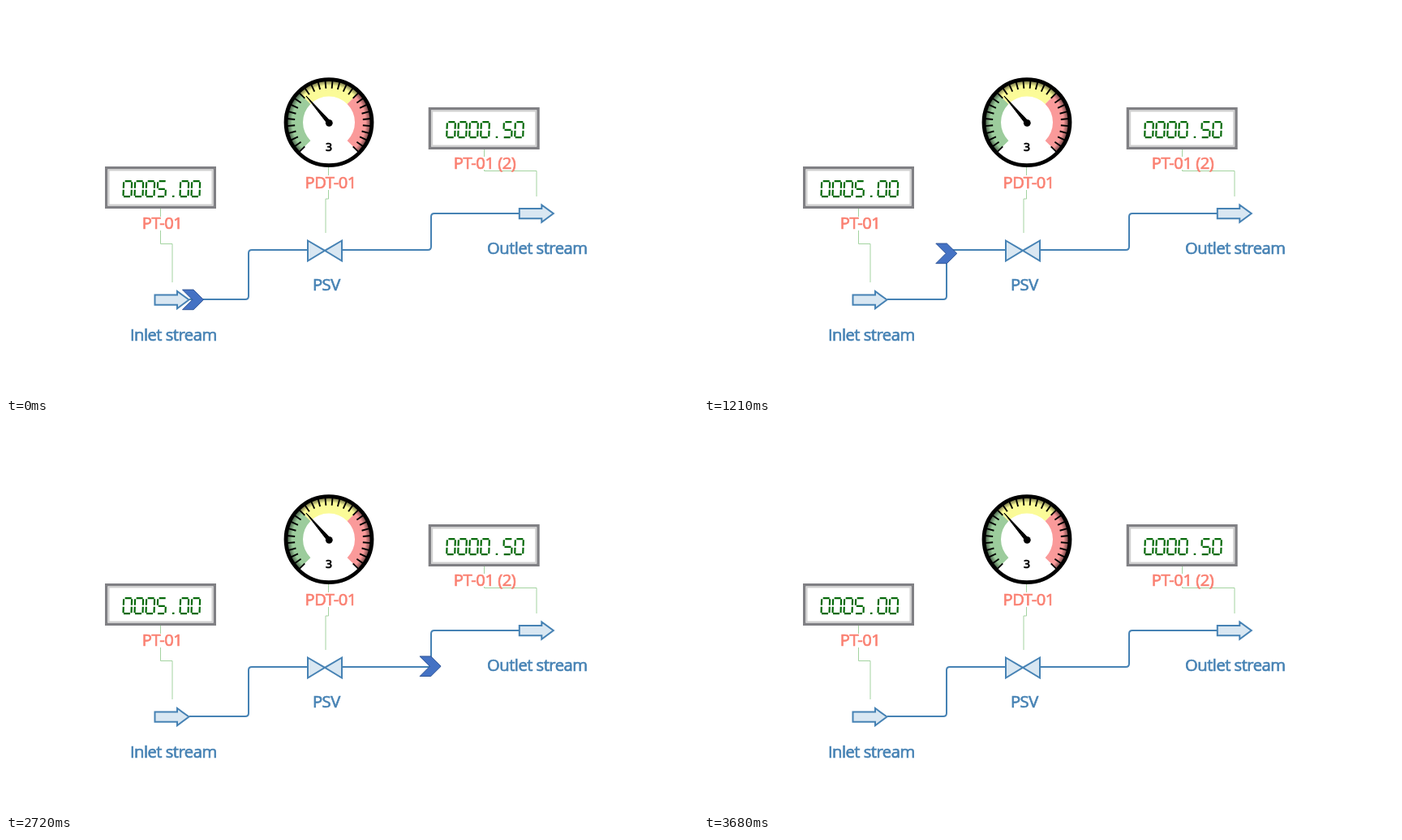
Write an HTML page that moves like this. It is 853x480 px and loops after 3.74 s.

```html
<!DOCTYPE html>
<html lang="en">
<head>
<meta charset="utf-8">
<title>Relief valve flow</title>
<style>
html, body { margin: 0; width: 100%; height: 100%; overflow: hidden; background: #fff; }
svg { display: block; width: 853px; height: 480px; }
.label { font: 500 20.2px "Open Sans", "Noto Sans", sans-serif; letter-spacing: -.5px; text-anchor: middle; stroke-width: .7; }
.blue { fill: #4682b4; stroke: #4682b4; }
.red { fill: #fa8072; stroke: #fa8072; }
.pipe { fill: none; stroke: #4682b4; stroke-width: 2; }
.part { fill: #d9e7f2; stroke: #4682b4; stroke-width: 2; }
.link { fill: none; stroke: #a3d3a0; stroke-width: 1; }
.digit { fill: none; stroke: #06690a; stroke-width: 2.2; }
</style>
</head>
<body>
<svg viewBox="0 0 853 480">
  <defs>
    <radialGradient id="rim" gradientUnits="userSpaceOnUse" cx="0" cy="0" r="52">
      <stop offset=".87" stop-color="#000" stop-opacity="0"/>
      <stop offset="1" stop-color="#000" stop-opacity=".6"/>
    </radialGradient>
  </defs>

  <g class="link">
    <path d="M190.5 250V260M190.5 277V293.5H205V341"/>
    <path d="M397.5 198V209M397.5 227V238H394V280"/>
    <path d="M589.5 177V186M589.5 202V203.5H654V235"/>
  </g>
  <g class="pipe">
    <path d="M226 362H295Q299 362 299 358V305Q299 301 303 301H372"/>
    <path d="M414 301H520Q524 301 524 297V260Q524 256 528 256H633"/>
  </g>
  <g class="part">
    <path id="arrow" d="M183.5 356.5H211V352L225.5 362.5L211 373.3V368.7H183.5Z"/>
    <use href="#arrow" x="449.3" y="-106.5"/>
    <path d="M372 289.5L393 301.8L372 314.5ZM414 289.5L393 301.8L414 314.5Z"/>
  </g>

  <g id="gauge" transform="translate(398 143.6)"></g>
  <g id="screens"></g>

  <g class="label red">
    <text x="192.6" y="275">PT-01</text>
    <text x="400.2" y="225">PDT-01</text>
    <text x="590" y="201">PT-01 (2)</text>
  </g>
  <g class="label blue">
    <text x="206.3" y="412.5">Inlet stream</text>
    <text x="394.8" y="351">PSV</text>
    <text x="654.8" y="306">Outlet stream</text>
  </g>

  <path id="chevron" d="M-13 -12.3H.6L13 0L.6 12.3H-13L-.7 0Z" fill="#4472c4" stroke="#2f5597"/>
</svg>
<script>
const LOOP = 3740;
const $ = id => document.getElementById(id);

// Point on the dial, angle in degrees clockwise from the top.
function polar(r, deg) {
  const a = deg * Math.PI / 180;
  return (r * Math.sin(a)).toFixed(2) + " " + (-r * Math.cos(a)).toFixed(2);
}

function drawGauge() {
  const band = (from, color) =>
    `<path fill="${color}" d="M${polar(52, from)}A52 52 0 0 1 ${polar(52, from + 90)}` +
    `L${polar(32, from + 90)}A32 32 0 0 0 ${polar(32, from)}Z"/>`;
  const sector = `M0 0L${polar(52, -135)}A52 52 0 1 1 ${polar(52, 135)}Z`;
  let ticks = "";
  for (let a = -135; a <= 135; a += 10) ticks += `M${polar(42, a)}L${polar(52, a)}`;
  $("gauge").innerHTML =
    `<circle r="52" fill="#fff"/>` +
    band(-135, "#9ccc9c") + band(-45, "#fbfb98") + band(45, "#fa9a9a") +
    `<path d="${sector}" fill="url(#rim)"/>` +
    `<path d="${ticks}" stroke="#000" stroke-width="1.9"/>` +
    `<circle r="53" fill="none" stroke="#000" stroke-width="4.8"/>` +
    `<path d="M-28 -32.5L-1.6 1.8L1.8 -1.4Z" stroke="#000"/>` +
    `<circle cx=".3" cy=".7" r="4.4"/>` +
    `<text y="35.8" text-anchor="middle" font-family="DejaVu Sans, sans-serif" font-size="14" stroke="#000" stroke-width=".6">3</text>`;
}

// Seven segments of a 12 by 21 cell, keyed a to g.
const SEGMENTS = {
  a: "M2.5 1H10.5", b: "M11 2V9.6", c: "M11 11.6V19", d: "M1.5 20H9.5",
  e: "M1 11.6V19", f: "M1 2V9.6", g: "M2 10.6H10"
};
const GLYPHS = { "0": "abcdef", "5": "afgcd" };

function screen(x, y, text) {
  const cells = [...text].map((ch, i) => {
    const d = ch === "." ? "M5.5 19.7H8" : [...GLYPHS[ch]].map(s => SEGMENTS[s]).join("");
    return `<path transform="translate(${x + 22.2 + 14 * i} ${y + 17.2}) skewX(-2)" d="${d}"/>`;
  }).join("");
  return `<rect x="${x + 1.7}" y="${y + 1.7}" width="133.6" height="48.6" fill="#fff" stroke="#808084" stroke-width="3.4"/>` +
    `<rect x="${x + 4.5}" y="${y + 4.5}" width="128" height="43" fill="none" stroke="#d0d0d0" stroke-width="2"/>` +
    `<g class="digit">${cells}</g>`;
}

// Each run: start, length, hidden from, then route points as [progress, x, y].
const RUNS = [
  { start: 70, span: 1840, end: 1930, route: [
    [0, 230.5, 362.4], [.172, 263.5, 362.4], [.304, 299, 362], [.417, 298.7, 345],
    [.659, 298.5, 312], [.739, 299, 301.7], [.932, 346.5, 301.7], [1, 358, 301.7]] },
  { start: 2060, span: 1580, end: 3680, route: [
    [0, 428, 301.8], [.35, 523.4, 300.2], [.65, 524, 257.8], [1, 619, 257.8]] }
];

const ease = u => u < .5 ? 2 * u * u : 1 - 2 * (1 - u) * (1 - u);

function along(route, p) {
  let i = 1;
  while (i < route.length - 1 && p > route[i][0]) i++;
  const [p0, x0, y0] = route[i - 1], [p1, x1, y1] = route[i];
  const k = (p - p0) / (p1 - p0);
  return [x0 + (x1 - x0) * k, y0 + (y1 - y0) * k];
}

// The picture advances every 60 ms, with a longer hold before each run.
function step(t) {
  if (t < 130) return 0;
  const shift = t < 2060 ? 10 : 20;
  return Math.floor((t - shift) / 60) * 60 + shift;
}

function render(time) {
  const t = step(time % LOOP);
  const run = RUNS[t < 2000 ? 0 : 1];
  const shown = t < run.end && (run === RUNS[0] || t >= run.start);
  $("chevron").style.display = shown ? "" : "none";
  if (!shown) return;
  const u = Math.min(1, Math.max(0, (t - run.start) / run.span));
  const [x, y] = along(run.route, ease(u));
  $("chevron").setAttribute("transform", `translate(${x.toFixed(2)} ${y.toFixed(2)})`);
}

drawGauge();
$("screens").innerHTML = screen(122, 198, "0005.00") + screen(520.7, 125, "0000.50");

let origin = null;
function tick(now) {
  if (origin === null) origin = now;
  render(now - origin);
  requestAnimationFrame(tick);
}
render(0);
requestAnimationFrame(tick);
</script>
</body>
</html>
```
